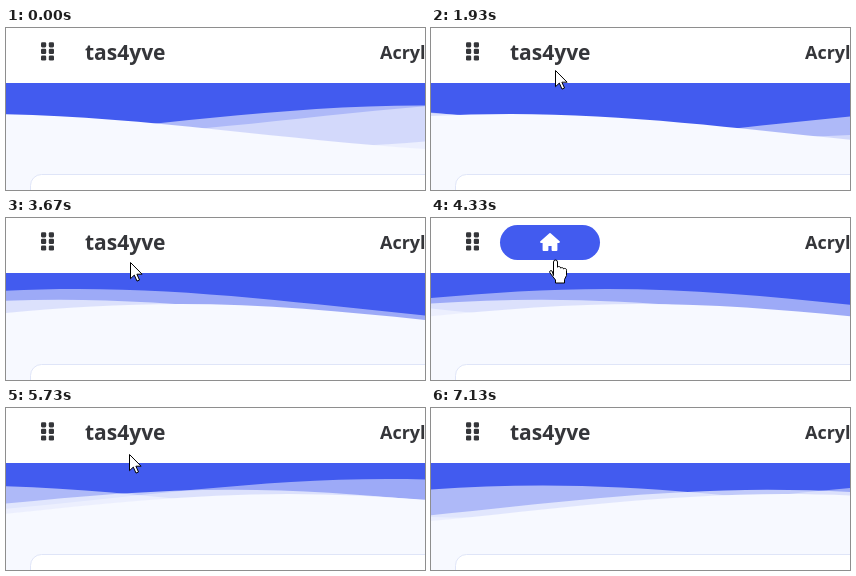
An HTML page for the animation above (7.19 s loop, 419 by 162 pixels).

```html
<!DOCTYPE html>
<html lang="en">
<head>
<meta charset="utf-8">
<style>
  html, body { margin: 0; width: 100%; height: 100%; overflow: hidden; background: #f7f9ff; }
  svg { display: block; width: 419px; height: 162px; }
  text { font-family: "Open Sans", "Noto Sans", sans-serif; font-weight: 700; fill: #35363a; }
</style>
</head>
<body>
<svg viewBox="0 0 419 162">
  <defs>
    <path id="wave" d="M-160 44c30 0 58-18 88-18s58 18 88 18 58-18 88-18 58 18 88 18v44h-352z"/>
  </defs>

  <rect width="419" height="162" fill="#f7f9ff"/>
  <rect y="55" width="419" height="71" fill="#425bef"/>
  <g id="waves" transform="translate(0 66.7) scale(6.3 2.143) translate(0 -24)" fill="#f7f9ff"></g>
  <rect x="24.5" y="146.5" width="480" height="80" rx="11" fill="#fff" stroke="#dfe5f8"/>

  <rect width="419" height="55" fill="#fff"/>
  <g id="dots" fill="#35363a"></g>
  <text id="name" x="79" y="32" font-size="21">tas4yve</text>
  <text x="374" y="30.5" font-size="18">Acrylic</text>

  <g id="home" opacity="0">
    <rect x="69" y="7" width="100" height="35" rx="17.5" fill="#425bef"/>
    <path d="M119 16l9 8h-2.5v8h-4v-5h-5v5h-4v-8h-2.5z" fill="#fff" stroke="#fff" stroke-width="1.8" stroke-linejoin="round"/>
  </g>

  <g id="cursor" fill="#fff" stroke="#000" stroke-linejoin="round">
    <path id="arrow" d="M.5 .5v16.2l3.8-3.6 2.7 6 2.5-1.1-2.6-5.8h5.2z"/>
    <path id="hand" d="M-1.5 15.5V2a2 2 0 0 1 4 0v5.2a1.8 1.8 0 0 1 3.2.9 1.8 1.8 0 0 1 3 .9 1.6 1.6 0 0 1 2.8 1.3v5.2l-2 4v3.5h-9v-3l-5.6-7.2c-1-1.6.9-3 2.2-1.7z"/>
  </g>
</svg>
<script>
const LOOP = 7190, FPS = 15;
const START = 27.25;  // seconds the waves have already run
const FADE = 130;

const $ = id => document.getElementById(id);
const make = (parent, tag, attrs) => {
  const el = document.createElementNS("http://www.w3.org/2000/svg", tag);
  for (const key in attrs) el.setAttribute(key, attrs[key]);
  return parent.appendChild(el);
};

for (const x of [35, 42.8])
  for (const y of [14.2, 20.8, 27.4])
    make($("dots"), "rect", { x, y, width: 5.2, height: 5.2, rx: 1.3 });

const waves = [
  { y: 0, period: 7, lead: 2, opacity: .5 },
  { y: 3, period: 10, lead: 3, opacity: .6 },
  { y: 5, period: 13, lead: 4, opacity: .7 },
  { y: 7, period: 20, lead: 5, opacity: 1 }
];
for (const w of waves)
  w.el = make($("waves"), "use", { href: "#wave", x: 48, y: w.y, opacity: w.opacity });

// cubic-bezier(.55, .5, .45, .5)
function ease(p) {
  let lo = 0, hi = 1;
  for (let i = 0; i < 24; i++) {
    const s = (lo + hi) / 2, r = 1 - s;
    if (1.65 * s * r * r + 1.35 * s * s * r + s ** 3 < p) lo = s;
    else hi = s;
  }
  return 1.5 * lo * (1 - lo) + lo ** 3;
}

// time, x, y of the pointer tip
const path = [
  [330, 134, 170], [400, 132, 135], [730, 125, 59], [1200, 123, 44],
  [1300, 123, 41], [1500, 123, 32], [1700, 124, 43], [1820, 124, 47],
  [1950, 124, 41], [2200, 124, 30], [2450, 124, 43], [2670, 124, 43],
  [2850, 124, 41], [3150, 124, 31], [3450, 124, 43], [3670, 124, 44],
  [3800, 124, 41], [4100, 124, 32], [4330, 124, 42], [4550, 124, 47],
  [4750, 124, 41], [5100, 123, 30], [5500, 123, 43], [5730, 123, 46],
  [5950, 123, 41], [6150, 123, 32], [6350, 123, 43], [6670, 123, 46],
  [6800, 125, 80], [6870, 127, 112], [6930, 129, 170]
];
const hovers = [[1300, 1700], [1950, 2450], [2850, 3450], [3800, 4400], [4750, 5500], [5950, 6350]];

function pointer(t) {
  const i = path.findIndex(k => k[0] > t);
  if (i < 1) return [0, 200];
  const [t0, x0, y0] = path[i - 1], [t1, x1, y1] = path[i];
  const p = (t - t0) / (t1 - t0);
  return [x0 + (x1 - x0) * p, y0 + (y1 - y0) * p];
}

const clamp = v => Math.max(0, Math.min(1, v));

function draw(t) {
  for (const w of waves) {
    const p = (t / 1000 + START + w.lead) / w.period % 1;
    w.el.setAttribute("transform", `translate(${-90 + 175 * ease(p)} 0)`);
  }

  let show = 0, over = false;
  for (const [a, b] of hovers) {
    show = Math.max(show, Math.min(clamp((t - a) / FADE), clamp(1 - (t - b) / FADE)));
    over = over || (t >= a && t < b);
  }
  $("home").setAttribute("opacity", show);
  $("name").setAttribute("opacity", 1 - show);

  const [x, y] = pointer(t);
  $("cursor").setAttribute("transform", `translate(${Math.round(x)} ${Math.round(y)})`);
  $("hand").style.display = over ? "" : "none";
  $("arrow").style.display = over ? "none" : "";
}

const begin = performance.now();
function tick() {
  const t = (performance.now() - begin) % LOOP;
  draw(Math.floor((t + 4) * FPS / 1000) * 1000 / FPS);
  requestAnimationFrame(tick);
}
tick();
</script>
</body>
</html>
```
